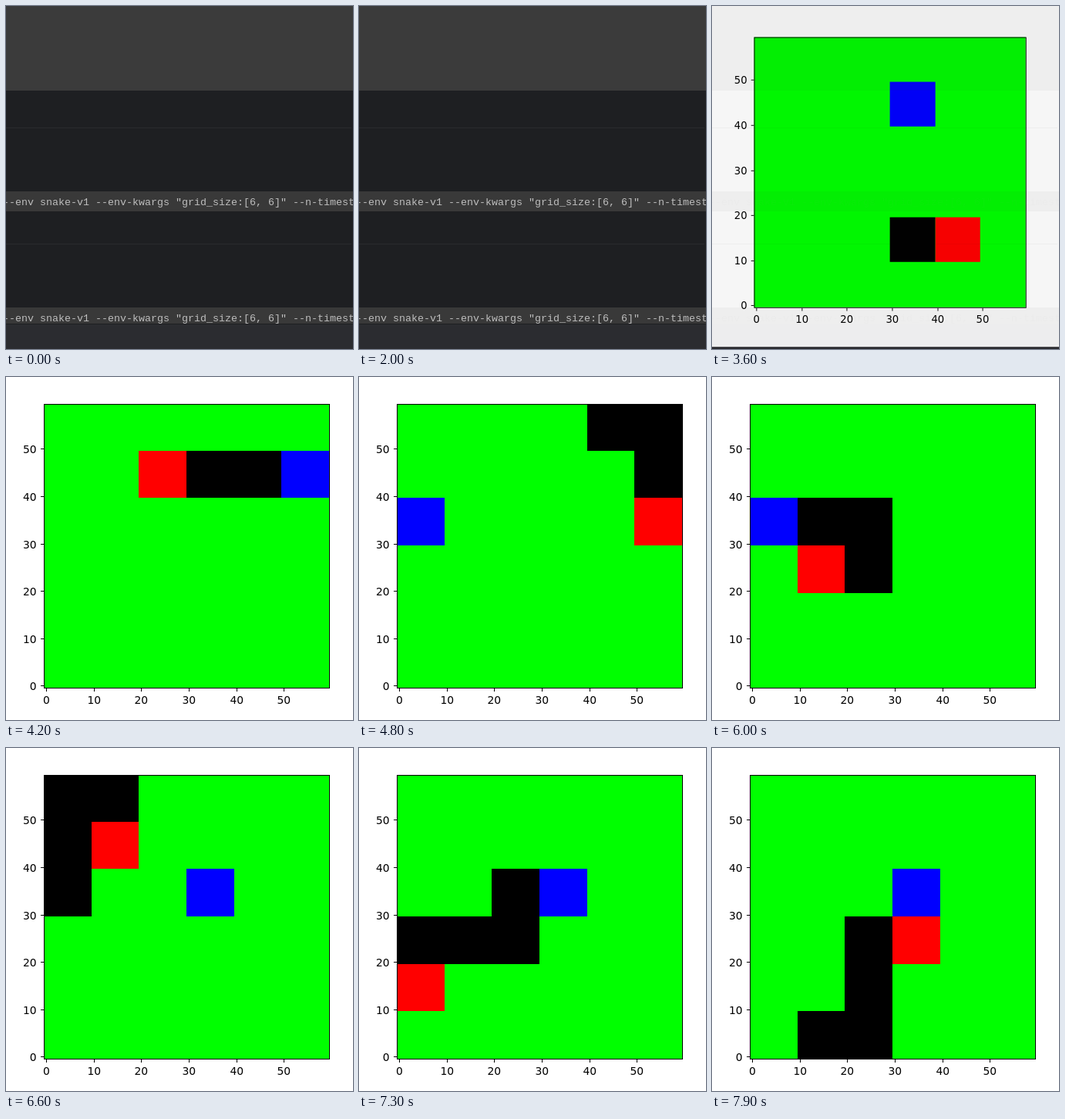
Recreate the animation shown at these times as an HTML page with a canvas. Size 450 px wide and 446 px high, loop 8000 ms.

```html
<!DOCTYPE html>
<html lang="en">
<head>
<meta charset="utf-8">
<title>Snake agent</title>
<style>
  html, body { margin: 0; width: 100%; height: 100%; overflow: hidden; background: #1e1f22; }
  canvas { display: block; }
</style>
</head>
<body>
<canvas id="stage" width="450" height="446"></canvas>
<script>
const ctx = document.getElementById('stage').getContext('2d');
const LOOP = 8000, STEP = 100, OPEN = 3600;
const PAUSES = [4100, 5500, 6800];   // ticks on which the snake waits
const COMMAND = '--env snake-v1 --env-kwargs "grid_size:[6, 6]" --n-timesteps 5000';

// Head route: start cell, then one letter per move.
const START = [4, 4];
const ROUTE = 'UUULLURRRDDLLULULDDRDLLUUURDDRDLLDDRRUUR';
const MOVES = { U: [0, -1], D: [0, 1], L: [-1, 0], R: [1, 0] };
const route = [START];
for (const letter of ROUTE) {
  const [x, y] = route[route.length - 1], [dx, dy] = MOVES[letter];
  route.push([x + dx, y + dy]);
}
const FOODS = [[3, 1], [5, 1], [0, 2], [3, 2]];

function rect(color, x, y, w, h) {
  ctx.fillStyle = color;
  ctx.fillRect(x, y, w, h);
}

function drawTerminal() {
  rect('#1e1f22', 0, 0, 450, 446);
  rect('#3b3b3b', 0, 0, 450, 110);
  rect('#2a2b2e', 0, 158, 448, 1);
  rect('#2a2b2e', 0, 309, 448, 1);
  rect('#393939', 0, 241, 450, 26);
  rect('#393939', 0, 392, 450, 21);
  ctx.font = '13.333px "Liberation Mono", monospace';
  ctx.textAlign = 'left';
  ctx.fillStyle = '#bdbdbd';
  ctx.fillText(COMMAND, -4, 259);
  ctx.fillText(COMMAND, -4, 410);
  rect('#1e1f22', 0, 413, 450, 1);
  rect('#2b2c30', 0, 414, 450, 32);
}

const edgeX = i => Math.floor(49.6 + 61.6 * i);
const edgeY = i => Math.max(35, edgeX(i) - 15);

function drawCell(color, [x, y]) {
  rect(color, edgeX(x), edgeY(y), edgeX(x + 1) - edgeX(x), edgeY(y + 1) - edgeY(y));
}

function drawPlot(step) {
  rect('#fff', -100, -100, 700, 558);
  rect('#0f0', 49, 35, 370, 369);

  let length = 2, eaten = 0;
  for (const [x, y] of route.slice(0, step + 1)) {
    const food = FOODS[eaten];
    if (food[0] === x && food[1] === y && eaten < FOODS.length - 1) {
      eaten++;
      length++;
    }
  }
  drawCell('#00f', FOODS[eaten]);
  route.slice(Math.max(0, step + 1 - length), step).forEach(cell => drawCell('#000', cell));
  if (step === 0) drawCell('#000', [3, 4]);
  drawCell('#f00', route[step]);

  ctx.strokeStyle = '#000';
  ctx.lineWidth = 1;
  ctx.strokeRect(49.5, 35.5, 370, 369);
  ctx.font = '13.89px "DejaVu Sans", sans-serif';
  for (let i = 0; i < 6; i++) {
    const x = Math.floor(52.7 + 61.6 * i), y = Math.round(401.3 - 61.6 * i);
    rect('#000', x, 405, 1, 4);
    rect('#000', 45, y, 4, 1);
    ctx.textAlign = 'center';
    ctx.fillText(i * 10, x + 0.3, 425);
    ctx.textAlign = 'right';
    ctx.fillText(i * 10, 39.7, y + 5.5);
  }
}

function draw(now) {
  const time = Math.floor(now % LOOP / STEP) * STEP;
  drawTerminal();
  if (time >= OPEN) {
    const tick = (time - OPEN) / STEP;
    const step = tick - PAUSES.filter(pause => time >= pause).length;
    // The window pops open: scale and opacity settle quickly.
    const scale = tick < 3 ? 1 - 0.048 * 0.25 ** tick : 1;
    ctx.save();
    ctx.translate(164 * (1 - scale), 150 * (1 - scale));
    ctx.scale(scale, scale);
    drawPlot(step);
    ctx.restore();
    if (tick === 0) {
      ctx.globalAlpha = 0.04;
      drawTerminal();
      ctx.globalAlpha = 1;
    }
  }
  requestAnimationFrame(() => draw(performance.now() - begin));
}

const begin = performance.now();
draw(0);
</script>
</body>
</html>
```
